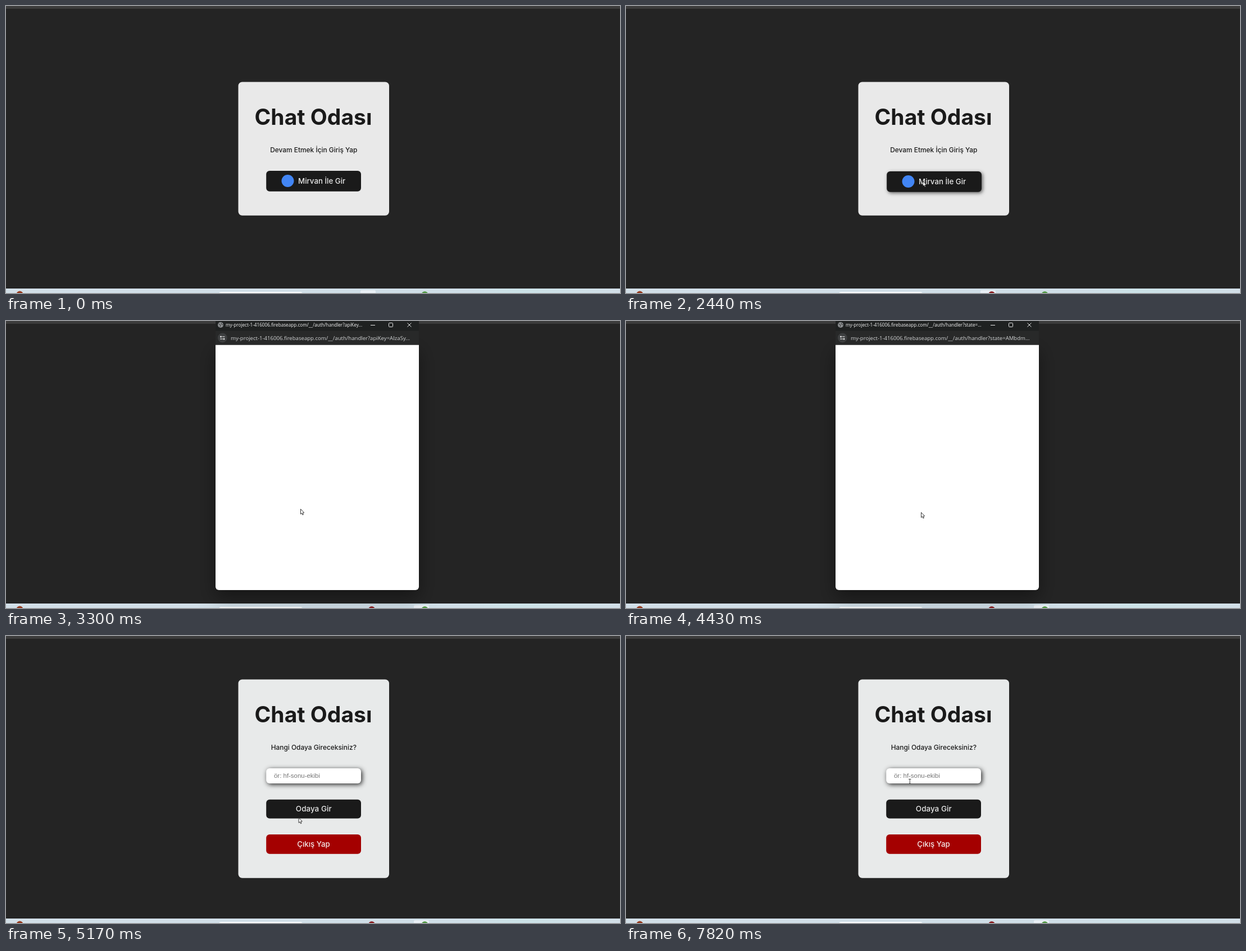
Write an HTML page with a canvas that moves like this. It is 1093 px wide and 512 px high and loops after 8000 ms.

```html
<!DOCTYPE html>
<html lang="tr">
<head>
<meta charset="utf-8">
<title>Chat Odası</title>
<style>
html, body { margin: 0; width: 100%; height: 100%; overflow: hidden; background: #242424; }
canvas { display: block; }
</style>
</head>
<body>
<canvas id="stage" width="1093" height="512"></canvas>
<script>
const ctx = document.getElementById('stage').getContext('2d');
const LOOP = 8000;
const POPUP_OPEN = 2510, POPUP_READY = 2760, POPUP_CLOSE = 4970, CLOSE_TIME = 180;
const UI = 'Inter, sans-serif';
const CHROME = '"Open Sans", sans-serif';
const HOST = 'my-project-1-416006.firebaseapp.com/__/auth/handler?';

// time, x, y
const POINTER = [
  [540, 825, 511], [1340, 522, 354], [1410, 522, 354], [1810, 525.5, 337],
  [2160, 528, 312], [3050, 528, 312], [3300, 524, 335], [3510, 524, 335],
  [4300, 525, 341], [4970, 525, 341], [5030, 522, 328], [5250, 520, 322],
  [5820, 508, 260], [6080, 516, 249], [6160, 516, 249], [6220, 514, 244],
  [6280, 511, 248], [6600, 511, 248], [6950, 505, 259], [8000, 505, 259]
];

const clamp = v => Math.max(0, Math.min(1, v));
const ramp = (t, from, to) => clamp((t - from) / (to - from));
const smooth = p => p * p * (3 - 2 * p);

function rect(x, y, w, h, color) {
  ctx.fillStyle = color;
  ctx.fillRect(x, y, w, h);
}

function box(x, y, w, h, r, color) {
  ctx.fillStyle = color;
  ctx.beginPath();
  ctx.roundRect(x, y, w, h, r);
  ctx.fill();
}

function dot(x, y, r, color) {
  ctx.fillStyle = color;
  ctx.beginPath();
  ctx.arc(x, y, r, 0, Math.PI * 2);
  ctx.fill();
}

function line(color, width, ...points) {
  ctx.strokeStyle = color;
  ctx.lineWidth = width;
  ctx.beginPath();
  points.forEach(([x, y], i) => i ? ctx.lineTo(x, y) : ctx.moveTo(x, y));
  ctx.stroke();
}

function text(str, x, y, font, color, align = 'left') {
  ctx.font = font;
  ctx.fillStyle = color;
  ctx.textAlign = align;
  ctx.fillText(str, x, y);
}

function shadow(dx, dy, blur, alpha) {
  ctx.shadowColor = `rgba(0,0,0,${alpha})`;
  ctx.shadowOffsetX = dx;
  ctx.shadowOffsetY = dy;
  ctx.shadowBlur = blur;
}

function noShadow() {
  shadow(0, 0, 0, 0);
}

function pointerAt(t) {
  const i = POINTER.findIndex(k => k[0] > t);
  if (i <= 0) return null;
  const a = POINTER[i - 1], b = POINTER[i];
  const p = smooth(ramp(t, a[0], b[0]));
  return [a[1] + (b[1] - a[1]) * p, a[2] + (b[2] - a[2]) * p];
}

function drawDesktop(t) {
  rect(0, 0, 1093, 512, '#242424');
  rect(0, 0, 1093, 5, '#3c3c3c');
  const bar = ctx.createLinearGradient(0, 0, 1093, 0);
  bar.addColorStop(0, '#d2dfe8');
  bar.addColorStop(0.75, '#d0dfe8');
  bar.addColorStop(0.83, '#cce3e8');
  bar.addColorStop(1, '#d2dfe8');
  rect(0, 504, 1093, 8, bar);
  box(379, 510, 149, 8, 4, '#fafcfd');
  box(t < POPUP_OPEN ? 631 : 726, 507, 27, 8, 2, '#eaf0f6');
  dot(24.5, 514.5, 6, '#963a1f');
  dot(745.5, 515, 6, '#559a4a');
  const rise = ramp(t, 60, 320);
  if (rise > 0) dot(651, 521 - 6 * rise, 6, '#8c2023');
}

function drawCard(y, h, color, prompt) {
  box(413.5, y, 268.5, h, 7, color);
  text('Chat Odası', 547, y + 76.5, '700 39px ' + UI, '#1a1a1a', 'center');
  text(prompt, 547.8, y + 125.3, '500 11.9px ' + UI, '#1a1a1a', 'center');
}

function drawButton(y, h, color, hover = 0) {
  if (hover) shadow(2 * hover, 2 * hover, 6, 0.6 * hover);
  box(463.2 + hover, y + hover, 168.8, h, 6, color);
  noShadow();
}

function drawLogin(t) {
  drawCard(135.5, 238.3, '#e9e9e9', 'Devam Etmek İçin Giriş Yap');
  const hover = ramp(t, 1950, 2160);
  drawButton(294, 36.7, '#1a1a1a', hover);
  dot(501.5 + hover, 312 + hover, 11, '#4285f4');
  text('Mirvan İle Gir', 520 + hover, 316.6 + hover, '500 13.3px ' + UI, '#e9e9e9');
}

function drawRoom(t) {
  drawCard(77.5, 354.3, '#e8eaea', 'Hangi Odaya Gireceksiniz?');
  shadow(2, 2, 8, 0.85);
  box(463.2, 236, 168.8, 27, 6, '#fff');
  noShadow();
  text('ör: hf-sonu-ekibi', 477, 253, '11.45px "Liberation Sans", sans-serif', '#757575');
  const caretOn = t >= 6230 && Math.floor((t - 6230) / 530) % 2 === 0;
  if (caretOn) rect(477, 243, 1, 13, '#000');
  const hover = ramp(t, 5250, 5400) * (1 - ramp(t, 5700, 5950));
  drawButton(291.7, 33.8, '#1a1a1a', hover);
  text('Odaya Gir', 547.7 + hover, 313 + hover, '500 13.5px ' + UI, '#e9e9e9', 'center');
  drawButton(354, 34.7, '#a40000');
  text('Çıkış Yap', 547.5, 375.6, '500 13.3px ' + UI, '#f3e9e9', 'center');
}

function drawAddress(t) {
  const late = t >= 4430;
  dot(382, 7, 5, '#8b8e90');
  line('#333', 1, [378.5, 5], [382, 7], [381, 10.5]);
  line('#333', 1, [383, 3], [384, 6], [386.5, 7]);
  text(HOST + (late ? 'state=...' : 'apiKey...'), 391, 10, '8.18px ' + CHROME, '#f2f2f2');
  dot(385.3, 30, 8.5, '#3c3e3f');
  line('#e3e3e3', 1.1, [384.7, 28], [389.5, 28]);
  line('#e3e3e3', 1.1, [381, 32], [386, 32]);
  dot(382.5, 28, 1.5, '#e3e3e3');
  dot(388, 32, 1.5, '#e3e3e3');
  text(HOST + (late ? 'state=AMbdm...' : 'apiKey=AIzaSy...'), 400, 33.6, '9.58px ' + CHROME, '#d3d5d6');
}

function drawHeader(t) {
  rect(373, -3, 362, 20.5, '#1f2121');
  rect(373, 17.5, 362, 25, '#282929');
  line('#e8e8e8', 1, [649, 7.5], [657, 7.5]);
  ctx.beginPath();
  ctx.roundRect(681.5, 3.5, 7, 7, 1);
  ctx.stroke();
  line('#e8e8e8', 1, [714.5, 3.5], [721.5, 10.5]);
  line('#e8e8e8', 1, [721.5, 3.5], [714.5, 10.5]);
  if (t >= 3050) drawAddress(t);
}

function drawProgress(t) {
  const left = ((t - 3510) * 0.3 + 263) % 515 - 153;
  const start = Math.max(0, left), end = Math.min(362, left + 153);
  rect(373, 42.5, 362, 3.6, '#bfc0dc');
  rect(373 + start, 42.5, end - start, 3.6, '#3f4bb3');
}

function drawPopup(t) {
  const opening = 1 - Math.pow(1 - ramp(t, POPUP_OPEN, POPUP_READY), 3);
  const leaving = Math.pow(ramp(t, POPUP_CLOSE, POPUP_CLOSE + CLOSE_TIME), 2);
  const ready = t >= POPUP_READY;
  const scale = 1 - 0.118 * (1 - opening) - 0.055 * leaving;
  ctx.save();
  ctx.globalAlpha = ramp(t, POPUP_OPEN - 20, POPUP_OPEN + 60) * clamp(1 - 1.08 * leaving);
  ctx.translate(554 - 4 * (1 - opening), 238.5);
  ctx.scale(scale, scale);
  ctx.translate(-554, -238.5);
  const top = ready ? 42.5 : -3;
  shadow(0, 12, 32, 0.4 * clamp(1 - 6 * leaving));
  box(373, top, 362, 480 - top, ready ? [0, 0, 6, 6] : 6, '#fff');
  noShadow();
  if (ready) drawHeader(t);
  if ((t >= 3510 && t < 4300) || t >= POPUP_CLOSE) drawProgress(t);
  ctx.restore();
}

function drawArrow(x, y) {
  ctx.save();
  ctx.translate(x + 0.5, y + 0.5);
  ctx.beginPath();
  [[0, 0], [0, 9], [2, 7.3], [3.4, 10.4], [4.9, 9.8], [3.6, 6.7], [6.2, 6.5]]
    .forEach(([px, py]) => ctx.lineTo(px, py));
  ctx.closePath();
  ctx.fillStyle = '#fff';
  ctx.fill();
  ctx.strokeStyle = '#222';
  ctx.lineWidth = 0.9;
  ctx.lineJoin = 'round';
  ctx.stroke();
  ctx.restore();
}

function drawBeam(x, y) {
  const l = x - 2, r = x + 2.5, m = x + 0.3;
  line('#333', 0.9, [l, y - 3.6], [r, y - 3.6]);
  line('#333', 0.9, [m, y - 3.6], [m, y + 4]);
  line('#333', 0.9, [l + 1, y + 4], [r - 1, y + 4]);
}

function draw(t) {
  drawDesktop(t);
  if (t < POPUP_CLOSE) drawLogin(t);
  else drawRoom(t);
  if (t >= POPUP_OPEN && t < POPUP_CLOSE + CLOSE_TIME) drawPopup(t);
  const pos = pointerAt(t);
  if (!pos) return;
  const overInput = t > POPUP_CLOSE && pos[1] < 263;
  (overInput ? drawBeam : drawArrow)(...pos);
}

const began = performance.now();
function tick() {
  draw((performance.now() - began) % LOOP);
  requestAnimationFrame(tick);
}
tick();
</script>
</body>
</html>
```
